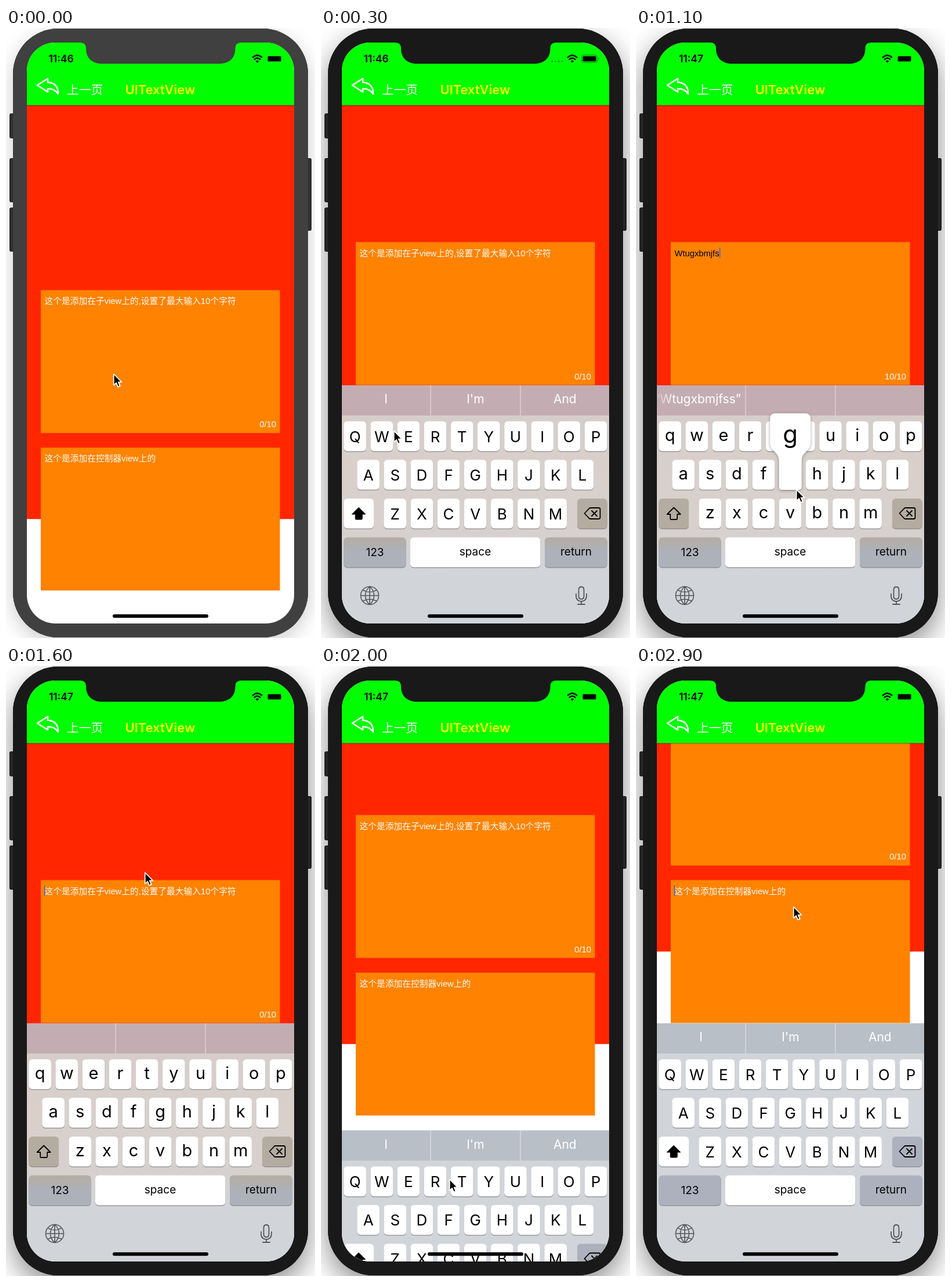
An HTML page with a canvas that plays this animation: 533x1050 px, repeating every 3 s.

```html
<!DOCTYPE html>
<html lang="zh">
<head>
<meta charset="utf-8">
<style>
html, body { margin: 0; height: 100%; overflow: hidden; background: #fff; }
canvas { display: block; }
</style>
</head>
<body>
<canvas id="stage" width="533" height="1050"></canvas>
<script>
const c = document.getElementById('stage').getContext('2d');
const UI = 'Inter, "Noto Sans CJK SC", "Noto Sans CJK", sans-serif';
const BODY = '"Liberation Sans", "Noto Sans CJK SC", "Noto Sans CJK", sans-serif';
const STEP = 100, LOOP = 3000;

// Characters typed at each step; the first field is left after step 17
const typed = [0,0,0,0,1,2,3,4,5,7, 10,10,10,8,3,0,0,0,0,0, 0,1,3,5,7,7,6,3,1,0];
// How far the keyboard is up where it is moving or down
const rise = { 0: 0, 1: 0, 2: .6, 18: .4, 19: 0, 20: .55 };
// Pointer stops: step, x, y
const stops = [
  [0,186,596], [1,186,596], [3,126,694], [4,105,705], [5,243,705], [6,330,705],
  [7,270,770], [8,178,835], [9,400,840], [10,130,775], [11,277,795], [13,466,838],
  [14,466,838], [16,240,356], [17,232,340], [19,222,884], [20,222,884], [21,130,772],
  [22,310,838], [23,190,828], [24,270,790], [25,462,838], [27,466,838], [29,272,415]
];

function box(x, y, w, h, fill, r = 0) {
  c.beginPath();
  c.roundRect(x, y, w, h, r);
  c.fillStyle = fill;
  c.fill();
}

function text(s, x, y, size, fill, { font = UI, weight = 400, align = 'left' } = {}) {
  c.font = `${weight} ${size}px ${font}`;
  c.textAlign = align;
  c.fillStyle = fill;
  c.fillText(s, x, y);
}

function shape(d, { x = 0, y = 0, fill, stroke, width = 2 }) {
  const p = new Path2D(d);
  c.save();
  c.translate(x, y);
  c.lineJoin = c.lineCap = 'round';
  c.lineWidth = width;
  if (fill) { c.fillStyle = fill; c.fill(p); }
  if (stroke) { c.strokeStyle = stroke; c.stroke(p); }
  c.restore();
}

function gradient(y0, y1, ...colors) {
  const g = c.createLinearGradient(0, y0, 0, y1);
  colors.forEach((col, i) => g.addColorStop(i / (colors.length - 1), col));
  return g;
}

function pointerAt(step) {
  const i = Math.max(1, stops.findIndex(s => s[0] >= step));
  const [a, x0, y0] = stops[i - 1], [b, x1, y1] = stops[i];
  const k = (step - a) / (b - a);
  return [x0 + (x1 - x0) * k, y0 + (y1 - y0) * k];
}

function body(active) {
  const edge = active ? '#101010' : '#262626';
  const side = active ? '#262626' : '#303030';
  box(0, 0, 533, 1050, '#fff');
  c.save();
  c.shadowColor = active ? 'rgba(0,0,0,.45)' : 'rgba(0,0,0,.2)';
  c.shadowBlur = active ? 48 : 34;
  c.shadowOffsetY = active ? 18 : 10;
  box(12, 1, 509, 1048, '#191919', 78);
  c.restore();
  for (const [x, y, h] of [[6, 147, 43], [6, 224, 76], [6, 309, 76], [516, 224, 125]]) {
    box(x, y, 11, h, edge, 3);
    box(x + 1, y + 1, 9, h - 2, side, 2);
  }
  box(12, 1, 509, 1048, active ? '#191919' : '#404040', 78);
}

function field(y, hint, value, count, caret) {
  box(60, y, 412.5, 246, '#ff8200');
  const s = value || hint;
  text(s, 66.5, y + 24, 14.75, value ? '#000' : '#fff', { font: BODY });
  if (caret) box(value ? 66.5 + c.measureText(value).width : 65.5, y + 9.5, 2, 18, '#4a6fd8');
  if (count) text(count, 466, y + 236, 14.75, '#fff', { font: BODY, align: 'right' });
}

function key(x, y, w, fill = '#fff') {
  box(x, y + 1.3, w, 51.5, '#898a8d', 6);
  box(x, y, w, 51.5, fill, 6);
}

function bubble(letter, x, y) {
  c.save();
  c.shadowColor = 'rgba(0,0,0,.35)';
  c.shadowBlur = 5;
  c.shadowOffsetY = 1;
  shape('M-26-80H26Q35-80 35-71V-30C35-14 19.5-14 19.5 2V46Q19.5 52 14 52H-14Q-19.5 52-19.5 46V2C-19.5-14-35-14-35-30V-71Q-35-80-26-80Z',
    { x, y, fill: '#fff' });
  c.restore();
  text(letter, x, y - 29, 42, '#000', { align: 'center' });
}

function suggestions(caps, value) {
  const opt = { align: 'center' };
  if (caps) {
    ['I', "I'm", 'And'].forEach((s, i) => text(s, 112 + i * 154.4, 646, 21, '#fff', opt));
  } else if (value) {
    const s = `“${value}”`;
    c.font = `400 21px ${UI}`;
    const long = c.measureText(s).width > 138;
    const fade = c.createLinearGradient(36, 0, 66, 0);
    fade.addColorStop(0, 'rgba(255,255,255,.2)');
    fade.addColorStop(1, '#fff');
    text(s, long ? 181 : 112, 646, 21, long ? fade : '#fff', { align: long ? 'right' : 'center' });
  }
}

function keyboard(caps, value, warm, pressed) {
  const ctr = { align: 'center' };
  const dark = warm ? '#b5aca1' : '#adb1be';
  const low = warm ? gradient(877, 928, '#b5ada2', '#adb1ba', '#adb1ba') : dark;
  box(36, 615, 461, 410, warm ? gradient(667, 945, '#d6cdca', '#d9d0cb', '#d7d0cc', '#d1d5da') : '#d1d5da');
  if (warm) box(36, 940, 461, 85, '#d1d5da');
  box(36, 615, 461, 52, warm ? '#c4adb2' : '#b9bfc7');
  box(188.5, 615, 1, 52, 'rgba(255,255,255,.65)');
  box(343.5, 615, 1, 52, 'rgba(255,255,255,.65)');
  suggestions(caps, value);

  let held;
  [['qwertyuiop', 39.3, 677], ['asdfghjkl', 62.3, 743.3], ['zxcvbnm', 108.4, 810]].forEach(([row, x0, y]) => {
    [...row].forEach((ch, i) => {
      const x = x0 + i * 46.15;
      key(x, y, 38.6);
      if (ch === pressed) held = [ch, x + 19.3, y];
      else text(caps ? ch.toUpperCase() : ch, x + 19.3, y + (caps ? 35.5 : 33.5), caps ? 26 : 29, '#000', ctr);
    });
  });

  key(39.3, 810, 51.7, caps ? '#fff' : dark);
  shape('M0-10.5L11.5 1H6V8.5Q6 10 4.5 10H-4.5Q-6 10-6 8.5V1H-11.5Z',
    { x: 65.2, y: 836, fill: caps && '#000', stroke: '#000', width: caps ? 1 : 1.8 });
  key(442, 810, 51.7, dark);
  shape('M-13.5 0L-5.5-8.5Q-4.5-9.5-3-9.5H11Q13.5-9.5 13.5-7V7Q13.5 9.5 11 9.5H-3Q-4.5 9.5-5.5 8.5ZM-1-4.5L8 4.5M8-4.5L-1 4.5',
    { x: 468, y: 835.5, stroke: '#000', width: 1.8 });

  key(39.3, 876.7, 107.3, low);
  key(154, 876.7, 224.3);
  key(386, 876.7, 107.5, low);
  text('123', 93, 909, 19, '#000', ctr);
  text('space', 266, 908, 19, '#000', ctr);
  text('return', 440, 908, 19, '#000', ctr);

  shape('M-15.5 0A15.5 15.5 0 1 0 15.5 0A15.5 15.5 0 1 0-15.5 0H15.5M0-15.5V15.5M0-15.5C-10-7-10 7 0 15.5C10 7 10-7 0-15.5M-12-9.5Q0-3 12-9.5M-12 9.5Q0 3 12 9.5',
    { x: 84, y: 977, stroke: '#54575b', width: 1.6 });
  shape('M0-15Q4.5-15 4.5-10V1Q4.5 6 0 6Q-4.5 6-4.5 1V-10Q-4.5-15 0-15ZM-9-3V1C-9 13 9 13 9 1V-3M0 10V15M-6 15H6',
    { x: 449, y: 977, stroke: '#54575b', width: 1.8 });
  if (held) bubble(...held);
}

function header(clock, detail) {
  box(36, 25, 461, 108, '#00fd00');
  box(36, 132.5, 461, 1, 'rgba(0,0,0,.45)');
  text(clock, 95, 59, 17.5, '#000', { weight: 600, align: 'center' });
  if (detail) {
    for (let i = 0; i < 4; i++) box(397 + i * 5.7, 56, 3.6, 3, 'rgba(0,70,0,.4)', 1.5);
    c.lineWidth = 1;
    c.strokeStyle = 'rgba(0,50,0,.55)';
    c.beginPath();
    c.roundRect(449.5, 46.5, 27, 13, 3.5);
    c.stroke();
    box(478, 51, 1.5, 4, 'rgba(0,50,0,.55)', 1);
  }
  box(451.5, 48.5, 23, 9, '#000', 1.5);
  shape('M425.8 50.5Q433.5 43.5 441.2 50.5M428.6 54Q433.5 49.5 438.4 54', { stroke: '#000', width: 2.4 });
  shape('M430.8 57Q433.5 54.5 436.2 57L433.5 60Z', { fill: '#000' });
  shape('M54 98.5L72 87V93.5C84 94 90 101 90 113.5C85 106.5 80 104.5 72 104.5V110Z', { stroke: '#fff', width: 2.6 });
  text('上一页', 105, 113.5, 20.8, '#fff', { weight: 300 });
  text('UITextView', 266, 113.5, 22, '#fffb00', { weight: 600, align: 'center' });
}

function draw(step) {
  const first = step < 19;
  const up = rise[step] ?? 1;
  const shift = up * (first ? 82.7 : 353.8);
  const value = (first ? 'Wtugxbmjfs' : 'Sbnhvgt').slice(0, typed[step]);
  const caps = !value && step !== 15 && step !== 16;
  const caret = up === 1 && step !== 3;
  const full = step === 11 || step === 12;

  body(step > 0);
  c.save();
  c.beginPath();
  c.roundRect(36, 25, 461, 1000, 49);
  c.clip();
  box(36, 25, 461, 1000, '#fff');
  box(36, 133, 461, 712.3 - shift, '#ff2600');
  field(451.2 - shift, '这个是添加在子view上的,设置了最大输入10个字符', first ? value : '',
    `${first ? value.length : 0}/10`, first && caret);
  field(722.3 - shift, '这个是添加在控制器view上的', first ? '' : value, '', !first && caret);
  header(step < 7 ? '11:46' : '11:47', step > 0 && step < 7);
  if (up) {
    c.save();
    c.translate(0, 410 * (1 - up));
    keyboard(caps, value + (full ? 's' : ''), first, step === 11 && 'g');
    c.restore();
  }
  box(184, 1009.3, 165, 6, '#000', 3);
  c.restore();

  shape('M128 24V25Q138 25 138 35C138 51 148 61.5 166 61.5H367C386 61.5 395.5 51 395.5 35Q395.5 25 405.5 25V24Z',
    { fill: step ? '#191919' : '#404040' });
  const [x, y] = pointerAt(step);
  shape('M0 0V18.5L4.2 14.6L7.2 21.6L10.6 20.2L7.6 13.3H13Z', { x, y, fill: '#000', stroke: '#fff', width: 2.2 });
  shape('M0.6 1.5V17L4.5 13.4L7.7 20.5L9.3 19.8L6.2 12.4H11.5Z', { x, y, fill: '#000' });
}

const start = performance.now();
function tick() {
  draw(Math.floor((performance.now() - start) % LOOP / STEP));
  requestAnimationFrame(tick);
}
tick();
</script>
</body>
</html>
```
